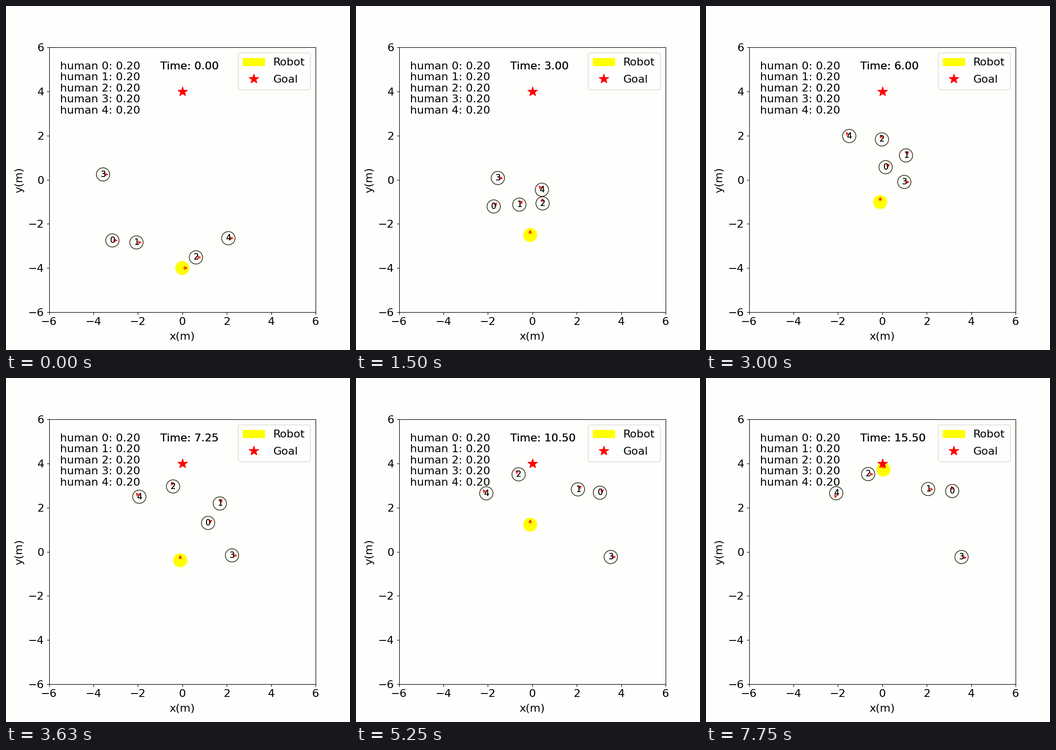
Write a matplotlib script that moves like this. It is 700 px wide and 700 px high and loops after 7.87 s.

```python
import numpy as np
import matplotlib.pyplot as plt
from matplotlib.animation import FuncAnimation
from matplotlib.lines import Line2D
from matplotlib.patches import ArrowStyle, Circle, FancyArrowPatch

FRAMES = 63
LOOP_MS = 7870
DT = 0.25            # simulated seconds per frame
RADIUS = 0.3
START_SPEED = 0.65   # humans set off slower than the 1 m/s they reach
CROSSED = 24         # frame at which every human has left the crowd
PAPER = "#fefefc"
INK = "#222208"
LABEL_SHIFT = np.array([-0.11, -0.11])

# Start and place after the crossing; the goal is opposite the start.
HUMANS = np.array([
    [(-3.147, -2.75), (0.15, 0.568)],
    [(-2.063, -2.84), (1.067, 1.10)],
    [(0.614, -3.518), (-0.017, 1.826)],
    [(-3.567, 0.24), (0.99, -0.10)],
    [(2.074, -2.65), (-1.488, 1.98)],
])


def goal_step(position, goal):
    """One frame towards the goal at 1 m/s, slowing within the last metre."""
    gap = goal - position
    return gap / max(1, np.hypot(*gap)) * DT


def human_path(start, crossed):
    goal = -start
    v0 = START_SPEED * goal_step(start, goal) * CROSSED
    v1 = goal_step(crossed, goal) * CROSSED
    s = np.linspace(0, 1, CROSSED + 1)[:, None]
    path = list((2 * s**3 - 3 * s**2 + 1) * start + (s**3 - 2 * s**2 + s) * v0
                + (3 * s**2 - 2 * s**3) * crossed + (s**3 - s**2) * v1)
    while len(path) < FRAMES:
        path.append(path[-1] + goal_step(path[-1], goal))
    return np.array(path)


def headings(path, wobble=0.0):
    """Direction of travel; the wobble makes resting humans look around."""
    steps = np.diff(path, axis=0)
    turn = rng.uniform(0, 2 * np.pi, len(steps))
    size = rng.uniform(0, wobble, len(steps))
    steps = steps + np.c_[size * np.cos(turn), size * np.sin(turn)]
    return np.r_[0, np.arctan2(steps[:, 1], steps[:, 0])]


rng = np.random.default_rng(4)
frames = np.arange(FRAMES)

# The robot steps left, drives straight up, then swerves to the goal.
robot_path = np.c_[
    np.interp(frames, [0, 2, 56, 60], [0, -0.094, -0.094, 0.05]),
    -4 + 0.1245 * frames,
]
human_paths = [human_path(*points) for points in HUMANS]
# Human 2 leans aside while the robot passes.
human_paths[2][:, 0] -= 0.055 * np.exp(-((frames - 54) / 8.3) ** 2)

paths = [robot_path] + human_paths
angles = [headings(robot_path)] + [headings(p, 0.0025) for p in human_paths]

plt.rcParams.update({"font.family": "DejaVu Sans", "font.size": 16})
fig, ax = plt.subplots(figsize=(7, 7), dpi=100, facecolor=PAPER)
ax.set_facecolor(PAPER)
ax.set_xlim(-6, 6)
ax.set_ylim(-6, 6)
ax.set_xlabel("x(m)", va="baseline")
ax.set_ylabel("y(m)", va="baseline", rotation_mode="anchor")
ax.xaxis.set_label_coords(0.5, -0.1035)
ax.yaxis.set_label_coords(-0.1005, 0.5)


def double_text(text, x=0, y=0, size=16):
    """Two stacked copies give slightly heavier glyph edges."""
    return [ax.text(x, y, text, fontsize=size) for _ in range(2)]


robot = ax.add_artist(Circle((0, -4), RADIUS, color="yellow"))
goal = ax.add_artist(Line2D([0], [4], color="red", marker="*",
                            linestyle="None", markersize=15))
legend = ax.legend([robot, goal], ["Robot", "Goal"], loc="upper right",
                   labelspacing=0.64, borderpad=0.46)
legend.get_frame().set_edgecolor("#d2d2c4")

discs, numbers = [robot], []
for i in range(len(HUMANS)):
    discs.append(ax.add_artist(Circle((0, 0), RADIUS, fill=False, edgecolor=INK)))
    numbers.append(double_text(str(i), size=12))
    ax.text(-5.5, 5 - 0.5 * i, f"human {i}: 0.20")
clock = double_text("", -1, 5)

style = ArrowStyle("->", head_length=4, head_width=2)
arrows = [ax.add_patch(FancyArrowPatch((0, 0), (RADIUS, 0), color="red",
                                       arrowstyle=style))
          for _ in paths]


def update(n):
    for disc, arrow, path, angle in zip(discs, arrows, paths, angles):
        disc.center = path[n]
        tip = path[n] + RADIUS * np.array([np.cos(angle[n]), np.sin(angle[n])])
        arrow.set_positions(path[n], tip)
    for labels, path in zip(numbers, human_paths):
        for label in labels:
            label.set_position(path[n] + LABEL_SHIFT)
    for label in clock:
        label.set_text(f"Time: {n * DT:.2f}")
    return discs + arrows + clock


animation = FuncAnimation(fig, update, frames=FRAMES, interval=LOOP_MS / FRAMES,
                          repeat=True, repeat_delay=0)
plt.show()
```
